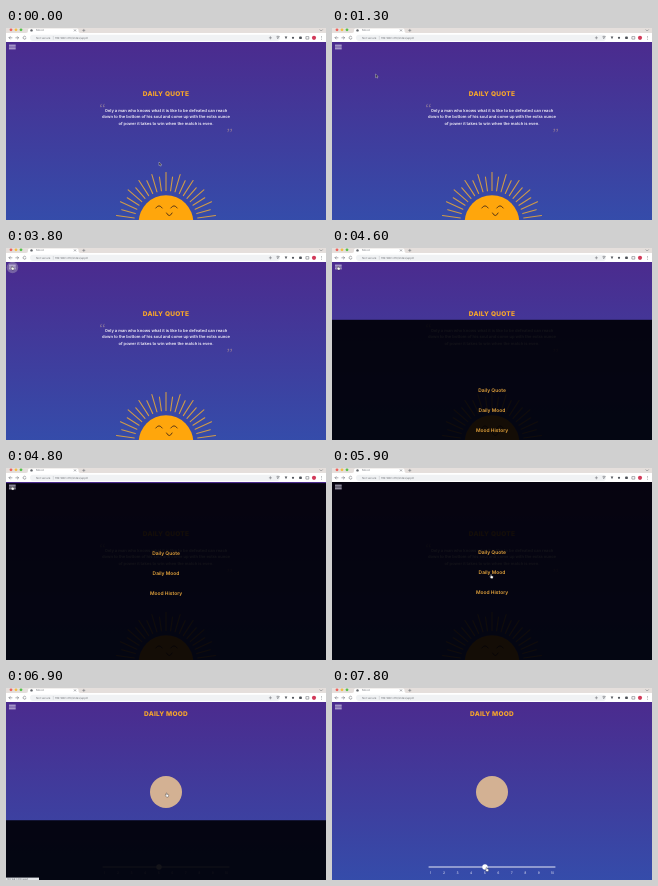
Animation, 320 px wide and 192 px high, one loop 8000 ms. Source, as an HTML page:

```html
<!DOCTYPE html>
<html lang="en">
<head>
<meta charset="utf-8">
<title>Daily quote and mood</title>
<style>
  html, body { margin: 0; width: 100%; height: 100%; overflow: hidden; background: #4b2b8e; }
  svg { display: block; width: 100vw; height: 100vh; font-family: Inter, "Open Sans", sans-serif; text-rendering: geometricPrecision; }
  .mid { text-anchor: middle; }
  .title { font-size: 6.5px; font-weight: 800; letter-spacing: .25px; fill: #f8a62a; }
  .quote { font-size: 4.12px; font-weight: 600; fill: #f4f1fa; }
  .mark { font: italic 14px "Liberation Serif", serif; fill: #84709a; }
  .item { font-size: 4.95px; font-weight: 600; fill: #e5a43c; }
  .tick { font-size: 3.4px; fill: #e9e9f6; }
  .tiny { font-size: 2.8px; fill: #74777c; }
  .line { fill: none; stroke-linecap: round; stroke-linejoin: round; }
</style>
</head>
<body>
<svg viewBox="0 0 320 192" preserveAspectRatio="none">
  <defs>
    <linearGradient id="sky" x1="0" y1="0" x2="0" y2="1">
      <stop offset="0" stop-color="#4b2b8e"/>
      <stop offset="1" stop-color="#354caa"/>
    </linearGradient>
  </defs>
  <rect y="14" width="320" height="178" fill="url(#sky)"/>

  <g id="quotePage">
    <text class="mid title" x="160" y="68.3">DAILY QUOTE</text>
    <text class="mark mid" x="96" y="84.5">“</text>
    <g class="mid quote">
      <text x="160" y="83.6">Only a man who knows what it is like to be defeated can reach</text>
      <text x="160" y="90.3">down to the bottom of his soul and come up with the extra ounce</text>
      <text x="160" y="97">of power it takes to win when the match is even.</text>
    </g>
    <text class="mark mid" x="223" y="110">”</text>
    <g id="rays" class="line" stroke="#cf9a48" stroke-width="1.1"></g>
    <circle cx="160" cy="194.5" r="27.3" fill="#ffa60c"/>
    <path class="line" stroke="#4a2c16" stroke-width=".9"
      d="M149.8 180q3.2-4.6 6.4 0M164.8 180q3.2-4.6 6.4 0M160.5 185q2.8 5.4 5.6 0"/>
  </g>

  <g id="moodPage">
    <text class="mid title" x="160" y="27.8">DAILY MOOD</text>
    <circle cx="160" cy="104" r="16" fill="#d3b193"/>
    <path class="line" stroke="#e6e8f6" stroke-width="1" d="M97 179H223"/>
    <circle cx="153" cy="179" r="2.7" fill="#fff"/>
    <g id="ticks" class="mid tick"></g>
  </g>

  <g id="menu">
    <rect y="14" width="320" height="178" fill="#000106" fill-opacity=".92"/>
    <g class="mid item">
      <text x="160" y="86">Daily Quote</text>
      <text x="160" y="106">Daily Mood</text>
      <text x="160" y="126">Mood History</text>
    </g>
  </g>

  <circle id="ripple" cx="6.5" cy="19.5" r="5.7" fill="#b9b4c4"/>
  <path class="line" stroke="#dcd6ea" stroke-width=".9" d="M3.4 17.2H9.3M3.4 19H9.3M3.4 20.8H9.3"/>
  <g id="status">
    <rect y="189.6" width="33" height="2.4" fill="#e4e6ea"/>
    <text x="1" y="191.8" class="tiny" style="font-size:2.4px">192.168.1.210/app#</text>
  </g>

  <g id="browser">
    <rect width="320" height="6" fill="#e5dfdc"/>
    <rect y="5" width="320" height="9" fill="#fff"/>
    <path d="M20 5q2 0 2-2V2q0-1.5 1.5-1.5H71q1.5 0 1.5 1.5V3q0 2 2 2z" fill="#fff"/>
    <circle cx="5" cy="1.8" r="1.4" fill="#f0605a"/>
    <circle cx="10" cy="1.8" r="1.4" fill="#f3bd45"/>
    <circle cx="15" cy="1.8" r="1.4" fill="#52c149"/>
    <circle cx="25.5" cy="2.4" r="1.2" fill="#5f6368"/>
    <text class="tiny" x="30" y="3.4">Mood</text>
    <rect x="24" y="6.7" width="250" height="6.2" rx="3.1" fill="#f0f2f4"/>
    <text class="tiny" x="30" y="10.8">Not secure</text>
    <path stroke="#b4b7bb" stroke-width=".4" d="M47.3 8v3.5"/>
    <text class="tiny" x="49" y="10.8">192.168.1.210/index/app#</text>
    <g class="line" stroke="#74777c" stroke-width=".6">
      <path d="M6 9.8H3l1.2-1.2M3 9.8l1.2 1.2M9.8 9.8H12.6l-1.2-1.2M12.6 9.8l-1.2 1.2M19.8 8.9a1.5 1.5 0 1 0 .2 1.3"/>
      <path d="M68.3 1.7l1.4 1.4M69.7 1.7l-1.4 1.4M76.7 2.4h2.2M77.8 1.3v2.2M314 1.8l1.2 1.2 1.2-1.2"/>
      <path d="M263.3 9.8h2.2M264.4 8.7v2.2M271 8.7l.7 2.1 1.4-2.1z"/>
      <rect x="300.3" y="8.6" width="2.5" height="2.5"/>
    </g>
    <g fill="#4d5157">
      <path d="M278.7 8.4h2.6l-1.3 2.8z"/>
      <circle cx="287" cy="9.8" r="1.1"/>
      <rect x="293.2" y="8.5" width="2.6" height="2.6" rx=".7"/>
      <circle cx="315.5" cy="8.4" r=".4"/>
      <circle cx="315.5" cy="9.8" r=".4"/>
      <circle cx="315.5" cy="11.2" r=".4"/>
    </g>
    <circle cx="308" cy="9.8" r="2.1" fill="#d23a59"/>
  </g>

  <g id="cursor" stroke-linejoin="round">
    <path id="arrow" transform="scale(.85)" d="M0 0V4.3L1.1 3.4 1.9 5 2.6 4.6 1.9 3.1 3.2 3z" fill="#222" stroke="#d5d2e0" stroke-width=".5"/>
    <path id="hand" transform="scale(.85)" d="M-.4 .1Q0-.5 .5 .1V1.5L2.5 2V3.6L1.9 4.8H0L-1.6 2.6 -1.1 2.1 -.4 2.7z" fill="#fff" stroke="#222" stroke-width=".4"/>
  </g>
</svg>
<script>
const LOOP = 8000, STEP = 100, SLIDE = 400;
const OPEN_AT = 4442, CLOSE_AT = 6745, SWAP_AT = 6400;
const PAGE_HEIGHT = 178;
const RAY_STEP = 8.2 * Math.PI / 180;
const el = id => document.getElementById(id);
const show = (id, on) => el(id).setAttribute("visibility", on ? "visible" : "hidden");
const move = (id, x, y) => el(id).setAttribute("transform", `translate(${x} ${y})`);
const clamp = v => Math.min(1, Math.max(0, v));

// time, x, y of the pointer
const path = [
  [0, 153, 134], [100, 153, 134], [700, 90, 84], [950, 90, 84],
  [1300, 43.5, 46], [1800, 6, 18], [4900, 6, 18],
  [5800, 158, 106], [5900, 159, 106.5], [6900, 160.5, 105],
  [7700, 154.5, 179.5], [LOOP, 154.5, 179.5]
];

function pointerAt(t) {
  const i = Math.max(1, path.findIndex(p => p[0] >= t));
  const [t0, x0, y0] = path[i - 1], [t1, x1, y1] = path[i];
  const k = (t - t0) / (t1 - t0);
  return [x0 + (x1 - x0) * k, y0 + (y1 - y0) * k];
}

// cubic-bezier(.25, .1, .25, 1)
function ease(x) {
  if (x <= 0 || x >= 1) return clamp(x);
  const curve = (a, b, s) => 3 * a * s * (1 - s) ** 2 + 3 * b * s * s * (1 - s) + s ** 3;
  let lo = 0, hi = 1;
  for (let i = 0; i < 20; i++) {
    const s = (lo + hi) / 2;
    if (curve(.25, .25, s) < x) lo = s; else hi = s;
  }
  return curve(.1, 1, lo);
}

function build() {
  let rays = "", ticks = "";
  for (let i = -10; i <= 10; i++) {
    const a = i * RAY_STEP, far = i % 2 ? 46 : 50;
    const at = r => `${160 + r * Math.sin(a)} ${194.5 - r * Math.cos(a)}`;
    rays += `<path d="M${at(32)}L${at(far)}"/>`;
  }
  for (let n = 1; n <= 10; n++)
    ticks += `<text x="${98.5 + (n - 1) * 13.55}" y="186.2">${n}</text>`;
  el("rays").innerHTML = rays;
  el("ticks").innerHTML = ticks;
}

function draw(t) {
  const opened = ease((t - OPEN_AT) / SLIDE), closed = ease((t - CLOSE_AT) / SLIDE);
  move("menu", 0, PAGE_HEIGHT * (1 - opened + closed));
  show("quotePage", t < SWAP_AT);
  show("moodPage", t >= SWAP_AT);
  show("status", t >= 6100 && t < 7000);
  el("ripple").setAttribute("opacity", t < 3800 ? 0 : .4 * clamp((4300 - t) / 500));

  const hand = (t >= 1800 && t < 5000) || (t >= 5800 && t < 7100) || t >= 7700;
  move("cursor", ...pointerAt(t));
  show("hand", hand);
  show("arrow", !hand);
}

function frame() {
  const t = performance.now() % LOOP;
  draw(Math.floor(t / STEP) * STEP);
  requestAnimationFrame(frame);
}

build();
frame();
</script>
</body>
</html>
```
